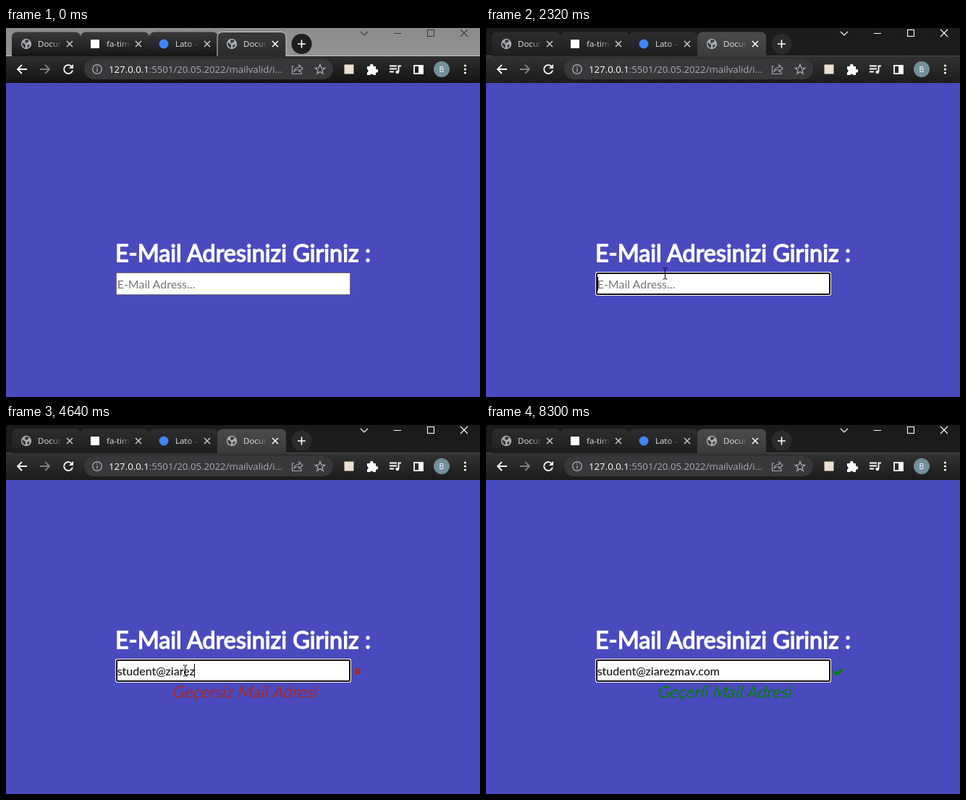
Write an HTML page that moves like this. It is 655 px wide and 510 px high and loops after 8630 ms.

```html
<!DOCTYPE html>
<html lang="tr">
<head>
<meta charset="utf-8">
<title>E-Mail</title>
<style>
  html, body { margin: 0; width: 100%; height: 100%; overflow: hidden; background: #4a4abf; }
  svg { display: block; width: 655px; height: 510px; }
  svg {
    --strip: #1b1b1b; --strip2: #1c1c1c; --edge: #4b4b4b; --tabA: #2d2d2d; --tabB: #1e1e1e;
    --onA: #4b4b4b; --onB: #3a3a3a; --rim: none; --plus: #2b2b2b; --win: #fff;
    --barA: #333; --barB: #1b1b1b;
  }
  svg.idle {
    --strip: #8c8c8c; --strip2: #929292; --edge: #c4c4c4; --tabA: #393939; --tabB: #151515;
    --onA: #393939; --onB: #2a2a2a; --rim: #cfcfcf; --plus: #1e1e1e; --win: #3c3c3c;
    --barA: #2f2f2f; --barB: #131313;
  }
  text { white-space: pre; }
  .ui { font-family: "Open Sans", "Noto Sans", sans-serif; }
  .page { font-family: Lato, sans-serif; }
  .line { fill: none; stroke: #fff; stroke-width: 1.8; }
  .dim { stroke: #a3a8ad; stroke-width: 1.4; }
  .win { fill: none; stroke: var(--win); stroke-width: 1.1; }
</style>
</head>
<body>
<svg id="stage" viewBox="0 0 655 510">
  <defs>
    <linearGradient id="strip" x2="0" y2="1">
      <stop stop-color="var(--strip)"/><stop offset="1" stop-color="var(--strip2)"/>
    </linearGradient>
    <linearGradient id="tab" x2="0" y2="1">
      <stop stop-color="var(--tabA)"/><stop offset="1" stop-color="var(--tabB)"/>
    </linearGradient>
    <linearGradient id="tabOn" x2="0" y2="1">
      <stop stop-color="var(--onA)"/><stop offset="1" stop-color="var(--onB)"/>
    </linearGradient>
    <linearGradient id="bar" x2="0" y2="1">
      <stop stop-color="var(--barA)"/><stop offset="1" stop-color="var(--barB)"/>
    </linearGradient>
    <linearGradient id="fade" gradientUnits="userSpaceOnUse" x1="54" x2="69">
      <stop stop-color="#e4e4e4"/><stop offset="1" stop-color="#e4e4e4" stop-opacity="0"/>
    </linearGradient>
    <g id="globe">
      <circle r="7.2" fill="#a9adb2"/>
      <path d="M-5 -2L-1 1L-1 5L-3 5L-6 1ZM-1 -6L4 -5L2 -2L-1 -1L-2 -3ZM2 1L5 1L3 5L1 4Z" fill="#38393b"/>
    </g>
  </defs>

  <rect width="655" height="510" fill="#4a4abf"/>

  <!-- window frame -->
  <rect width="655" height="39" fill="url(#strip)"/>
  <rect y="38" width="655" height="1" fill="var(--edge)"/>
  <rect y="39" width="655" height="37" fill="url(#bar)"/>
  <g id="tabs" class="ui" font-size="11.5"></g>
  <circle cx="408.5" cy="22" r="14" fill="var(--plus)"/>
  <path class="line" d="M403 22H414M408.5 16.5V27.5" style="stroke-width:1.6"/>
  <g class="win">
    <path d="M490 5L495 10L500 5M536 7.5H546M628 2L638 12M638 2L628 12"/>
    <rect x="582.5" y="2.5" width="9" height="9"/>
  </g>

  <!-- toolbar -->
  <path class="line" d="M29 57H16M22 51L16 57L22 63"/>
  <path class="line" d="M47 57H60M54 51L60 57L54 63" style="stroke:#808080"/>
  <path class="line" d="M91 53.5A6 6 0 1 0 92 58.5"/>
  <path d="M93 50V56H87Z" fill="#fff"/>
  <rect x="108" y="43" width="344" height="28" rx="14" fill="#37383a"/>
  <circle class="line dim" cx="126" cy="57" r="6.3"/>
  <path class="line dim" d="M126 56V60.5M126 53V54.6"/>
  <text class="ui" x="142" y="62" font-size="13.2" fill="#a8adb2"><tspan fill="#fff">127.0.0.1</tspan>:5501/20.05.2022/mailvalid/i...</text>
  <path class="line dim" d="M398 53H395.5V63.5H408V60M398 60Q399 54.5 405 54.5V51.2L410 56L405 60.5V57.5Q400.5 57.3 398 60Z" style="stroke-width:1.2"/>
  <path class="line dim" id="star"/>
  <rect x="467.5" y="50.5" width="13" height="13" fill="#eadfd2"/>
  <path d="M499 53H503A2.4 2.4 0 1 1 507.5 53H511V57A2.4 2.4 0 1 1 511 61.5V65H507.5A2.4 2.4 0 0 0 503 65H499V61.5A2.4 2.4 0 0 0 499 57Z" fill="#fff"/>
  <path class="line" d="M530 52.5H540M530 56.5H540M530 60.5H536M542.5 61V52.5H546"/>
  <circle cx="540.8" cy="61" r="2.3" fill="#fff"/>
  <rect class="line" x="564" y="52" width="12" height="11"/>
  <rect x="570" y="52" width="6" height="11" fill="#fff"/>
  <circle cx="602" cy="57" r="11" fill="#728f9b"/>
  <text class="ui" x="602" y="61" font-size="10.5" fill="#fff" text-anchor="middle">B</text>
  <g fill="#fff"><circle cx="634.5" cy="52" r="1.6"/><circle cx="634.5" cy="57" r="1.6"/><circle cx="634.5" cy="62" r="1.6"/></g>

  <!-- form -->
  <g id="form" class="page">
    <text x="150.9" y="323" font-size="32.4" fill="#fff" stroke="#fff" stroke-width="1.4">E-Mail Adresinizi Giriniz :</text>
    <rect id="plain" x="152.5" y="338.5" width="323" height="30" fill="#fff" stroke="#767676"/>
    <g id="focus">
      <rect x="151" y="337" width="326" height="33" rx="3" fill="#fff"/>
      <rect x="153" y="339" width="322" height="29" rx="1.5" fill="#fff" stroke="#101010" stroke-width="2"/>
    </g>
    <text id="hint" x="153.7" y="360" font-size="16" fill="#757575">E-Mail Adress...</text>
    <text id="typed" x="153.7" y="360" font-size="16"></text>
    <rect id="caret" y="344" width="1" height="19"/>
    <path id="mark" fill="none"/>
    <text id="note" font-size="22.6" text-anchor="middle" transform="translate(328.8 391) skewX(-14)"></text>
  </g>

  <!-- pointers -->
  <path id="arrow" d="M.5 .5V15L4 11.7L6.5 17.3L8.8 16.3L6.3 10.8H11Z" fill="#fff" stroke="#000"/>
  <g id="beam">
    <circle id="click" cx="-2.5" cy="-1" r="15" fill="#f5f52a" opacity=".7" style="mix-blend-mode:multiply"/>
    <path d="M-3 -7.5H-.5M.5 -7.5H3M-3 7.5H-.5M.5 7.5H3M0 -7V7" fill="none" stroke="#000"/>
  </g>
</svg>
<script>
const LOOP = 8630;
const ADDRESS = 'student@ziarezmav.com';
const $ = id => document.getElementById(id);
const show = (el, on) => el.setAttribute('visibility', on ? 'inherit' : 'hidden');
const moveTo = (el, x, y) => el.setAttribute('transform', `translate(${x} ${y})`);

// [start, value] steps; each value holds until the next one
const letters = [[0, 0], [2650, 2], [2980, 4], [3320, 6], [3650, 7], [3980, 9], [4310, 11], [4640, 14],
  [4970, 16], [5300, 17], [5630, 18], [6310, 20], [6640, 21]];
const blink = [[0, 0], [1330, 1], [1990, 0], [2320, 1], [6970, 0], [7630, 1], [8300, 0]];
const pointer = [[0, ['none', 0, 0]], [330, ['arrow', 557, 456]], [660, ['arrow', 344, 383]],
  [1000, ['beam', 248.5, 349]], [1330, ['click', 248.5, 349]], [1660, ['beam', 247.5, 339.5]],
  [7300, ['arrow', 411, 422]], [7630, ['none', 0, 0]]];
const at = (steps, t) => steps.findLast(s => s[0] <= t)[1];

const globe = '<use href="#globe" x="20" y="22"/>';
const tabs = [
  [8, 'Document', globe],
  [103, 'fa-times', '<rect x="14" y="16" width="12" height="12" fill="#fff"/>'],
  [198, 'Lato - F', '<circle cx="20" cy="22" r="6.5" fill="#4285f4"/>'],
  [292, 'Document', globe]
];
$('tabs').innerHTML = tabs.map(([x, title, icon], i) => {
  const on = i === 3;
  return `<g transform="translate(${x} 0)">
    <path d="M0 39V13Q0 5.5 8 5.5H87Q95 5.5 95 13V39" fill="url(#${on ? 'tabOn' : 'tab'})" stroke="${on ? 'var(--rim)' : 'none'}"/>
    ${i < 2 ? '<rect x="95" y="12" width="1" height="21" fill="#5c5c5c"/>' : ''}${icon}
    <text x="36" y="26" fill="url(#fade)">${title}</text>
    <path class="line" d="M76 18L84 26M84 18L76 26" style="stroke-width:1.5;stroke:${on ? '#fff' : '#ccc'}"/></g>`;
}).join('');

$('star').setAttribute('d', 'M' + Array.from({ length: 10 }, (_, i) => {
  const a = i * Math.PI / 5, r = i % 2 ? 3 : 7;
  return [434 + r * Math.sin(a), 57.5 - r * Math.cos(a)].map(v => v.toFixed(1));
}).join('L') + 'Z');

function setMark(valid) {
  const color = valid ? '#008000' : '#a52a2a';
  $('mark').setAttribute('d', valid ? 'M480.5 354.5L485 358.5L492.7 351' : 'M482 351L489 358M489 351L482 358');
  $('mark').setAttribute('stroke', color);
  $('mark').setAttribute('stroke-width', valid ? 3.6 : 3.4);
  $('note').setAttribute('fill', color);
  $('note').textContent = valid ? 'Geçerli Mail Adresi' : 'Geçersiz Mail Adresi';
}

function draw(t) {
  const count = at(letters, t), focused = t >= 1330;
  const [kind, x, y] = at(pointer, t);
  $('stage').classList.toggle('idle', t < 330);

  moveTo($('form'), 0, count ? -14 : 0);
  show($('plain'), !focused);
  show($('focus'), focused);
  show($('hint'), !count);
  show($('mark'), count);
  show($('note'), count);
  setMark(count === ADDRESS.length);

  $('typed').textContent = ADDRESS.slice(0, count);
  $('caret').setAttribute('x', count ? Math.floor(153.7 + $('typed').getComputedTextLength()) : 154);
  show($('caret'), at(blink, t));

  show($('arrow'), kind === 'arrow');
  show($('beam'), kind === 'beam' || kind === 'click');
  $('click').style.display = kind === 'click' ? '' : 'none';
  moveTo($('arrow'), x, y);
  moveTo($('beam'), x, y);
}

const start = performance.now();
function tick() {
  draw((performance.now() - start) % LOOP);
  requestAnimationFrame(tick);
}
tick();
</script>
</body>
</html>
```
